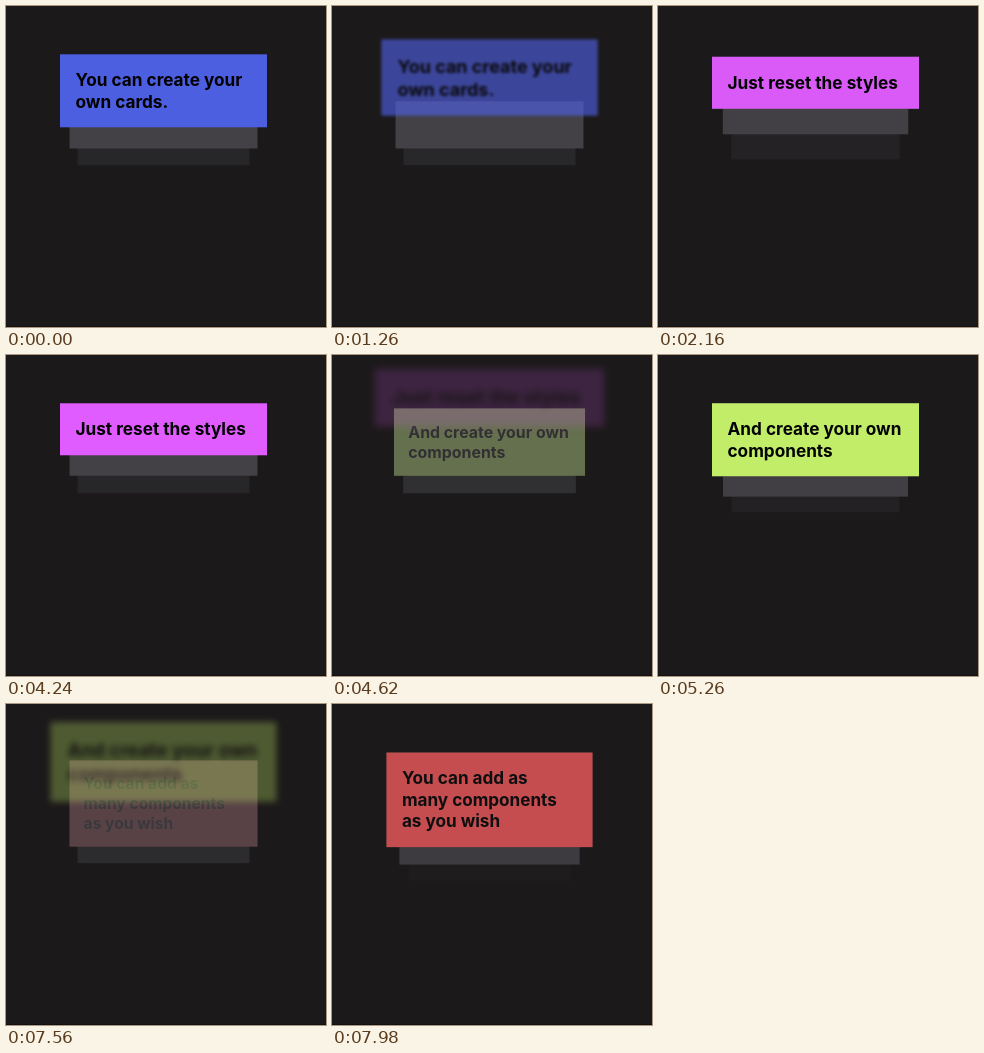
These frames come from a looping animation (320 by 321 pixels, 8000 ms). An HTML page:

```html
<!DOCTYPE html>
<html lang="en">
<head>
<meta charset="utf-8">
<title>Card stack</title>
<style>
  html, body { margin: 0; width: 100%; height: 100%; overflow: hidden; background: #1c191a; }
  .stage { position: relative; width: 320px; height: 321px; overflow: hidden; }
  .stage::after { content: ""; position: absolute; left: 0; bottom: 0; width: 100%; height: 1px; background: #111; }
  .card { position: absolute; left: 54px; top: 0; width: 207.2px; transform-origin: 50% 100%; }
  .face {
    box-sizing: border-box; padding: 15.4px 15.5px; height: 100%;
    font: 700 17.2px/21.4px Inter, "Liberation Sans", sans-serif;
    color: #000; white-space: nowrap;
  }
</style>
</head>
<body>
<div class="stage" id="stage"></div>
<script>
const LOOP = 8000, TOP = 48.3;
const SWAPS = [-1900, 1100, 4240, 7260];
const CARDS = [
  ["#4d5fe1", "You can create your", "own cards."],
  ["#e05cff", "Just reset the styles"],
  ["#c8f76b", "And create your own", "components"],
  ["#ec5052", "You can add as", "many components", "as you wish"]
];

// Resting places from front to the hidden one behind the stack
const SLOTS = [
  { drop: 0, scale: 1, tone: [67, 65, 69] },
  { drop: 20.8, scale: 0.908, tone: [67, 65, 69] },
  { drop: 37.8, scale: 0.831, tone: [39, 38, 41] },
  { drop: 55, scale: 0.757, tone: [28, 25, 26] }
];

// [delay, duration] for a card arriving in each slot
const MOVES = [
  { y: [240, 1170], scale: [300, 583], tone: [0, 1] },
  { y: [460, 1200], scale: [300, 1400], tone: [100, 1300] },
  { y: [640, 1200], scale: [400, 1400], tone: [420, 1600] }
];
const REVEAL = [160, 1200], LEAVE = [0, 720];

const mix = (a, b, p) => a + (b - a) * p;
const bezier = (a, b, u) => 3 * a * u * (1 - u) ** 2 + 3 * b * u * u * (1 - u) + u ** 3;

// cubic-bezier(.25, .1, .25, 1)
function ease(x) {
  if (x <= 0) return 0;
  if (x >= 1) return 1;
  let lo = 0, hi = 1;
  for (let i = 0; i < 24; i++) {
    const mid = (lo + hi) / 2;
    if (bezier(0.25, 0.25, mid) < x) lo = mid; else hi = mid;
  }
  return bezier(0.1, 1, lo);
}
const progress = (t, [delay, duration]) => ease((t - delay) / duration);

const stage = document.getElementById("stage");
const cards = CARDS.map(([color, ...lines]) => {
  const el = document.createElement("div"), face = document.createElement("div");
  const height = 30.4 + 21.4 * lines.length;
  el.className = "card";
  el.style.height = height + "px";
  face.className = "face";
  face.style.background = color;
  face.innerHTML = lines.join("<br>");
  el.append(face);
  stage.append(el);
  return { el, face, height };
});

function place(card, bottom, scale) {
  card.el.style.transform = `translateY(${bottom - card.height}px) scale(${scale})`;
}

function leave(card, t) {
  const p = progress(t, LEAVE), scale = 1 + 0.13 * p;
  place(card, TOP + card.height - 38 * p + card.height * (scale - 1) / 2, scale);
  card.el.style.opacity = 1 - p;
  card.el.style.filter = p > 0 ? `blur(${4 * p}px)` : "none";
  card.face.style.opacity = 1;
}

function advance(card, slot, t, oldBase, base) {
  const from = SLOTS[slot + 1], to = SLOTS[slot], move = MOVES[slot];
  const tone = progress(t, move.tone);
  place(card,
    mix(oldBase + from.drop, base + to.drop, progress(t, move.y)),
    mix(from.scale, to.scale, progress(t, move.scale)));
  card.el.style.opacity = 1;
  card.el.style.filter = "none";
  card.el.style.backgroundColor = `rgb(${from.tone.map((v, i) => mix(v, to.tone[i], tone))})`;
  card.face.style.opacity = slot === 0 ? progress(t, REVEAL) : 0;
}

function draw(time) {
  let front = SWAPS.length - 1;
  while (SWAPS[front] > time) front--;
  const t = time - SWAPS[front], n = cards.length;
  const last = cards[(front + n - 1) % n];
  const base = TOP + cards[front].height, oldBase = TOP + last.height;
  leave(last, t);
  last.el.style.zIndex = n;
  for (let slot = 0; slot < n - 1; slot++) {
    const card = cards[(front + slot) % n];
    card.el.style.zIndex = n - 1 - slot;
    advance(card, slot, t, oldBase, base);
  }
}

const start = performance.now();
function tick() {
  draw((performance.now() - start) % LOOP);
  requestAnimationFrame(tick);
}
tick();
</script>
</body>
</html>
```
